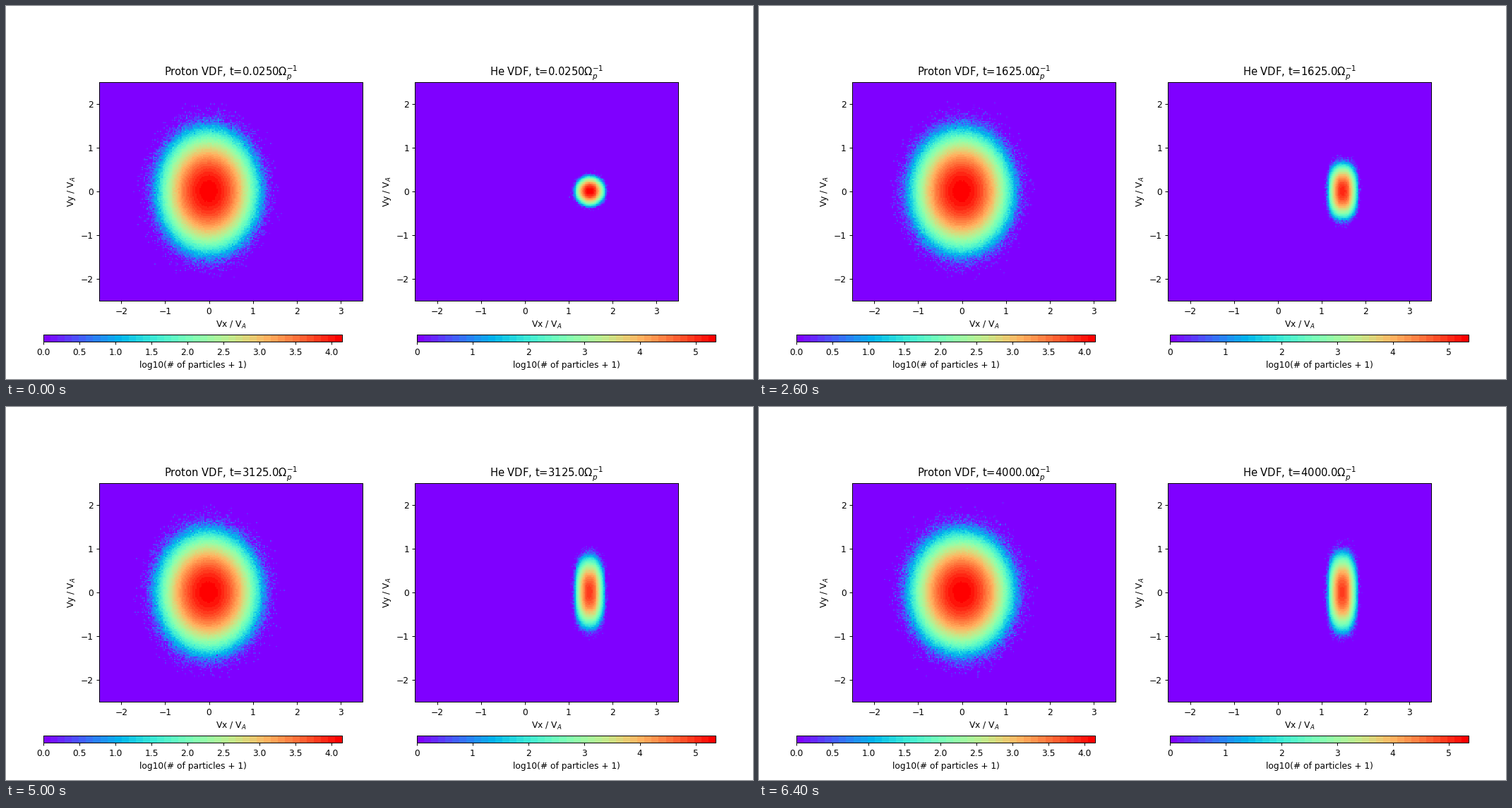
A matplotlib script that plays this animation: 1058x529 px, repeating every 6.6 s.

```python
import matplotlib.pyplot as plt
import numpy as np
from matplotlib.animation import FuncAnimation

FRAMES, INTERVAL = 33, 200
BINS = 200
EXTENT = (-2.5, 3.5, -2.5, 2.5)

plt.rcParams["font.family"] = "DejaVu Sans"
rainbow = plt.get_cmap("rainbow").resampled(42)


def bin_centres(low, high):
    width = (high - low) / BINS
    return low + width * (np.arange(BINS) + 0.5)


vx, vy = np.meshgrid(bin_centres(*EXTENT[:2]), bin_centres(*EXTENT[2:]))


def log_counts(rng, peak, centre, sigma_x, sigma_y, squareness=1.0):
    """Poisson counts of a bell whose contours are (super)ellipses."""
    u = ((vx - centre) / sigma_x) ** 2 / 2
    v = (vy / sigma_y) ** 2 / 2
    energy = (u ** squareness + v ** squareness) ** (1 / squareness)
    return np.log10(rng.poisson(peak * np.exp(-energy)) + 1)


def proton_counts(i):
    s = i / (FRAMES - 1)
    rng = np.random.default_rng(100 + i)
    return log_counts(rng, 13600, -0.01, 0.317 + 0.008 * s, 0.39 - 0.01 * s)


def helium_counts(i):
    # Perpendicular diffusion: the variance in Vy grows linearly with time.
    stretch = np.sqrt(1 + 0.204 * i)
    rng = np.random.default_rng(500 + i)
    squareness = 1 + 0.25 * (1 - np.exp(-i / 4))
    centre = 1.488 - 0.012 * i / (FRAMES - 1)
    return log_counts(rng, 225000 / stretch, centre,
                      0.082, 0.082 * stretch, squareness)


def title(species, i):
    time = f"{0.025 + 125 * i:.4f}"[:6]
    return rf"{species} VDF, t={time}$\Omega_p^{{-1}}$"


fig, axes = plt.subplots(1, 2, figsize=(12, 6), dpi=529 / 6)
fig.subplots_adjust(left=0.125, right=0.9, bottom=0.125, top=0.88, wspace=0.2)

panels = []
for ax, species, counts, vmax, bar_left in (
        (axes[0], "Proton", proton_counts, 4.145, 0.05),
        (axes[1], "He", helium_counts, 5.36, 0.55)):
    image = ax.imshow(counts(0), origin="lower", extent=EXTENT, cmap=rainbow,
                      vmin=0, vmax=vmax, interpolation="nearest")
    ax.set_xticks(range(-2, 4))
    ax.set_yticks(range(-2, 3))
    ax.set_xlabel("Vx / V$_A$")
    ax.set_ylabel("Vy / V$_A$")
    ax.set_title(title(species, 0))
    bar_ax = fig.add_axes([bar_left, 0.1, 0.4, 0.02])
    fig.colorbar(image, cax=bar_ax, orientation="horizontal",
                 label="log10(# of particles + 1)")
    panels.append((ax, image, species, counts))


def update(i):
    for ax, image, species, counts in panels:
        image.set_data(counts(i))
        ax.set_title(title(species, i))
    return [panel[1] for panel in panels]


anim = FuncAnimation(fig, update, frames=FRAMES, interval=INTERVAL,
                     repeat=True, repeat_delay=0, blit=False)
plt.show()
```
